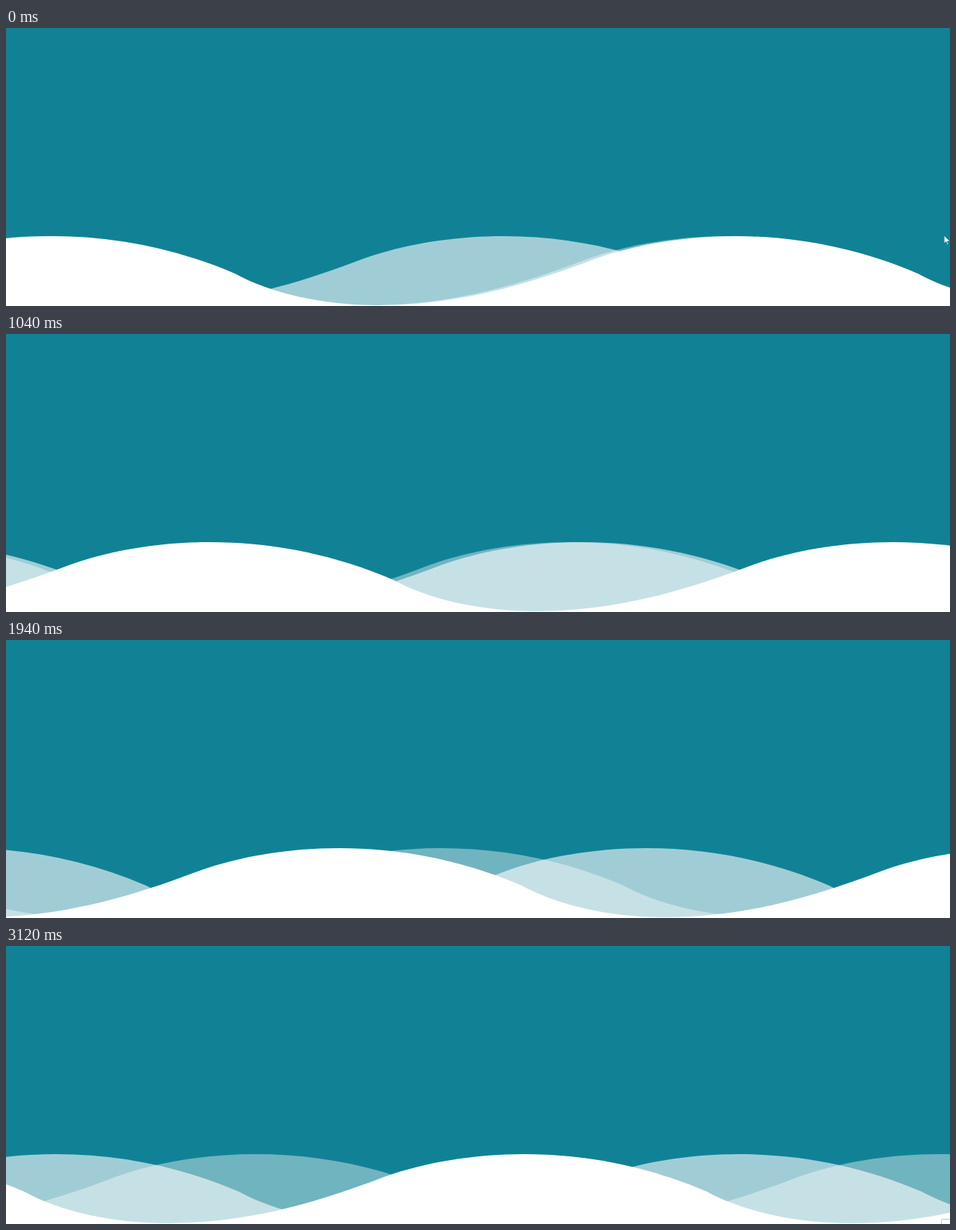
Recreate the animation shown at these times as an HTML page. Size 1280 by 378 pixels, loop 3140 ms.

```html
<!DOCTYPE html>
<html lang="en">
<head>
<meta charset="utf-8">
<title>Waves</title>
<style>
  @property --x { syntax: "<number>"; inherits: true; initial-value: 62.5; }

  html, body { margin: 0; width: 100%; height: 100%; overflow: hidden; background: #118296; }
  svg { display: block; width: 1280px; height: 378px; animation: drift 3140ms infinite; }

  .wave { fill: #fff; }
  .back { opacity: .4; transform: translate(calc((1041 - var(--x)) * 1px), 283px); }
  .mid { opacity: .6; transform: translate(calc((642.5 + var(--x) / 2) * 1px), 283px); }
  .front { transform: translate(calc(var(--x) * 1px), 283px); }

  .pointer { fill: #fff; stroke-width: 1; animation: roam 3140ms linear infinite; }
  .corner { fill: #fff; stroke: #b4ced4; animation: appear 3140ms step-end infinite; }

  /* the picture advances every 20 ms */
  @keyframes drift {
    0% { --x: 62.5; animation-timing-function: steps(36); }
    22.93% { --x: 219; animation-timing-function: steps(31); }
    42.675% { --x: 330; animation-timing-function: steps(13); }
    50.955% { --x: 384.5; animation-timing-function: steps(35); }
    73.248% { --x: 522.5; animation-timing-function: steps(25); }
    89.172% { --x: 634; animation-timing-function: steps(16); }
    99.363% { --x: 702.5; animation-timing-function: steps(1); }
    100% { --x: 706.5; }
  }
  @keyframes roam {
    0%, 1% { transform: translate(1272px, 282px); stroke: #118296; }
    10% { transform: translate(1284px, 290px); stroke: #118296; }
    41% { transform: translate(1284px, 334px); stroke: #222; }
    42.5%, 43.2% { transform: translate(1279px, 334px); stroke: #222; }
    45% { transform: translate(1284px, 336px); stroke: #222; }
    62% { transform: translate(1284px, 350px); stroke: #333; }
    72%, 75% { transform: translate(1251.5px, 361.5px); stroke: #333; }
    84%, 100% { transform: translate(1284px, 384px); stroke: #333; }
  }
  @keyframes appear {
    0% { opacity: 0; }
    86%, 100% { opacity: 1; }
  }
</style>
</head>
<body>
<svg viewBox="0 0 1280 378">
  <path class="wave back"/>
  <path class="wave mid"/>
  <path class="wave front"/>
  <path class="corner" d="M1268.5 380V371.5H1282V380Z"/>
  <path class="pointer" d="M0 0V11L2.6 8.6 4.4 12.6 6 12 4.3 8H8Z"/>
</svg>
<script>
  // one swell, trough to trough, with its crest at the origin of the middle copy
  const swell = "c105 0 199 -26.5 294 -63c54 -19.5 122 -31 190 -31" +
                "c84 0 168 16.5 248 51c48 26.4 119 43 194 43";
  const outline = "M-1410 94" + swell.repeat(3) + "V100H-1410Z";
  for (const wave of document.querySelectorAll(".wave")) wave.setAttribute("d", outline);
</script>
</body>
</html>
```
